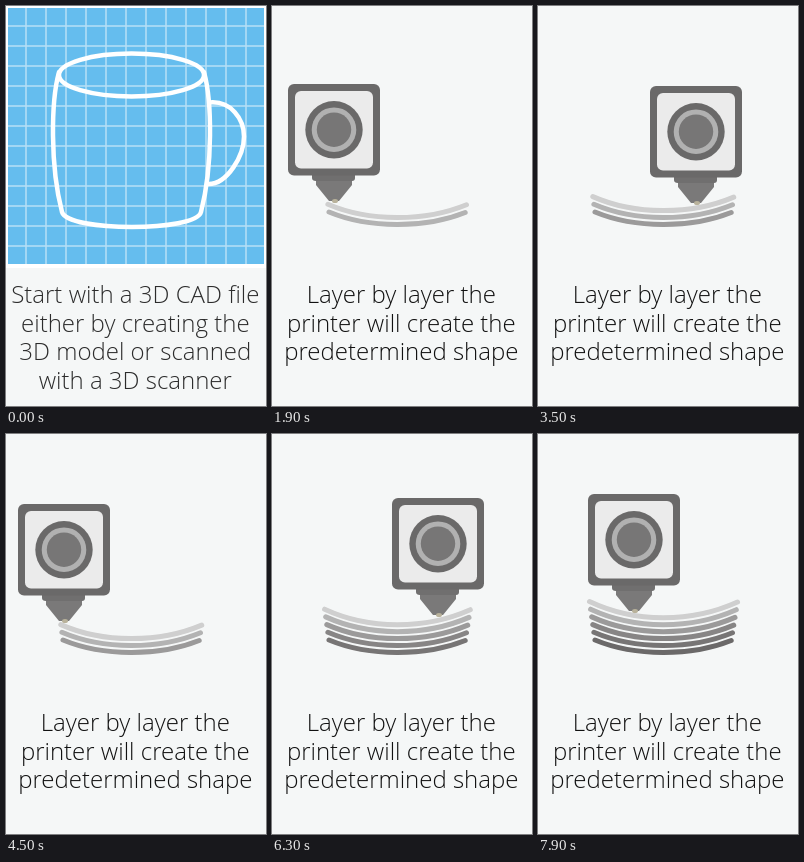
These frames come from a looping animation (260x400 px, 8000 ms). An HTML page:

```html
<!DOCTYPE html>
<html lang="en">
<head>
<meta charset="utf-8">
<title>3D printing a mug</title>
<style>
  html, body { margin: 0; width: 100%; height: 100%; overflow: hidden; background: #f5f7f7; }
  svg { display: block; width: 260px; height: 400px; }
  text { font: 300 24px "Open Sans", sans-serif; text-anchor: middle; }
</style>
</head>
<body>
<svg viewBox="0 0 260 400">
  <g id="intro">
    <rect width="260" height="262" fill="#fff"/>
    <rect x="2" y="2" width="256" height="256" fill="#65bdee"/>
    <path id="grid" stroke="#b7dff6" stroke-width="1.5"/>
    <g fill="none" stroke="#fff" stroke-width="4.5" stroke-linejoin="round" stroke-linecap="round">
      <ellipse cx="125.5" cy="69" rx="72.5" ry="21.5"/>
      <path d="M53 66C45 95 44 160 56 206C62 226 190 226 195 206C207 160 206 95 198 66"/>
      <path d="M203.500 96.500C225 94.500 238 113 238 130.500C238 149.500 221.500 178 202.500 178"/>
    </g>
    <g id="introText" fill="#2c2c2c"></g>
  </g>
  <g id="printing">
    <g id="layers" fill="none" stroke-width="5" stroke-linecap="round"></g>
    <!-- Print head: x = 0 is its axis, y = 0 its top edge -->
    <g id="head">
      <path d="M-18 96H18V101L5 117H-5L-18 101Z" fill="#7a7979"/>
      <path d="M-22 90H21V94Q21 97 18 97H-18Q-22 97 -22 94Z" fill="#706f6f"/>
      <ellipse cx="1" cy="117" rx="3" ry="2" fill="#b9b29b"/>
      <rect x="-46" width="92" height="91.500" rx="6" fill="#6a6969"/>
      <rect x="-39" y="7" width="78" height="77.500" rx="6" fill="#ebebeb"/>
      <circle cy="45.700" r="28.700" fill="#6a6969"/>
      <circle cy="45.700" r="22.300" fill="#b1b1b1"/>
      <circle cy="45.700" r="17.200" fill="#777676"/>
    </g>
    <g id="printText" fill="#111"></g>
  </g>
</svg>
<script>
const LOOP = 8000, STEP = 100, PRINT_START = 500;
const SHADES = ["#cfcfcf", "#b3b3b3", "#9b9a9a", "#878585", "#777575", "#6b6969"];

// Each pass prints one layer: start time, first x and direction of travel
const PASSES = [
  [500, 192, -1], [1900, 62, 1], [3300, 178, -1],
  [4600, 58, 1], [6000, 196, -1], [7500, 56, 1]
].map(([start, x, dir]) => ({ start, x, dir }));

const el = id => document.getElementById(id);

function add(parent, tag, attrs) {
  const node = document.createElementNS("http://www.w3.org/2000/svg", tag);
  for (const key in attrs) node.setAttribute(key, attrs[key]);
  return parent.appendChild(node);
}

function addLines(parent, lines) {
  lines.forEach((line, i) => {
    add(parent, "text", { x: 129.3, y: 297 + 28.7 * i }).textContent = line;
  });
}

addLines(el("introText"), [
  "Start with a 3D CAD file", "either by creating the",
  "3D model or scanned", "with a 3D scanner"
]);
addLines(el("printText"), [
  "Layer by layer the", "printer will create the", "predetermined shape"
]);

let gridPath = "";
for (let p = 20; p < 258; p += 20) gridPath += `M${p} 2V258M2 ${p}H258`;
el("grid").setAttribute("d", gridPath);

function layerPath(i) {
  const left = 57 - 1.1 * i, right = 193.2 + 1.27 * i;
  const endY = 206 - 7.7 * i, controlY = 222.6 - 6.7 * i;
  return `M${left} ${endY}C97 ${controlY} 153 ${controlY} ${right} ${endY + 0.5}`;
}
const layers = PASSES.map((_, i) => add(el("layers"), "path", { d: layerPath(i) }));

function draw(time) {
  const t = Math.floor(time % LOOP / STEP) * STEP;
  const printing = t >= PRINT_START;
  el("intro").style.display = printing ? "none" : "";
  el("printing").style.display = printing ? "" : "none";
  if (!printing) return;

  const current = PASSES.filter(pass => pass.start <= t).length - 1;
  layers.forEach((layer, i) => {
    layer.style.display = i <= current ? "" : "none";
    layer.style.stroke = SHADES[Math.max(0, current - i)];
  });

  // The head follows a shallow bowl, raised 7px per layer
  const { start, x: firstX, dir } = PASSES[current];
  const x = firstX + dir * (t - start) / 10;
  const rise = 15.2 * (Math.abs(x - 126) / 70) ** 1.8;
  const y = Math.round(98 - rise - 7 * current);
  el("head").setAttribute("transform", `translate(${x} ${y})`);
}

const origin = performance.now();
function tick() {
  draw(performance.now() - origin);
  requestAnimationFrame(tick);
}
tick();
</script>
</body>
</html>
```
